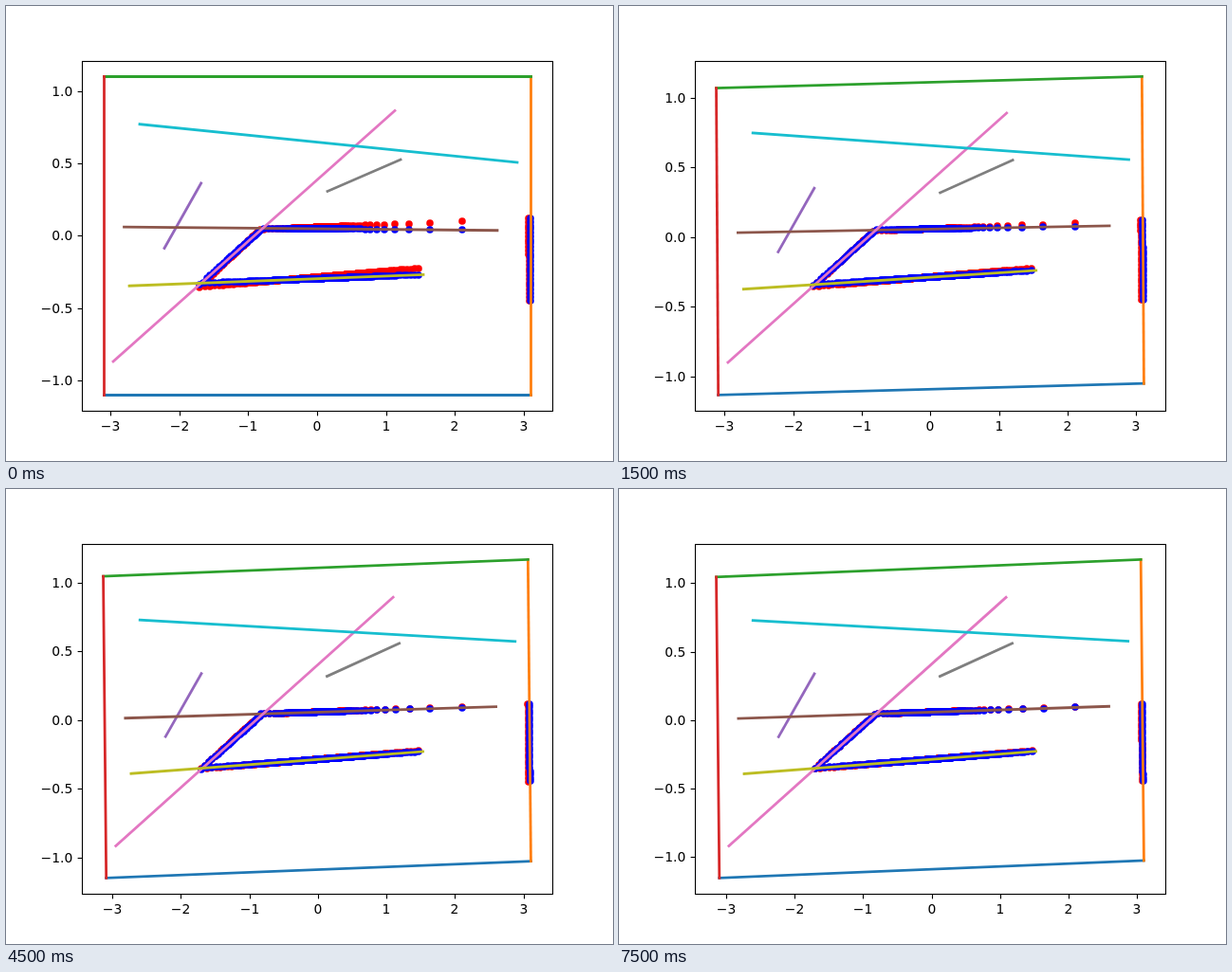
Recreate the animation shown at these times as an HTML page with a canvas. Size 640 by 480 pixels, loop 8 s.

```html
<!DOCTYPE html>
<html lang="en">
<head>
<meta charset="utf-8">
<title>Scan matching</title>
<style>
html, body { margin: 0; width: 640px; height: 480px; overflow: hidden; background: #fff; }
canvas { display: block; }
</style>
</head>
<body>
<canvas id="stage" width="640" height="480"></canvas>
<script>
const ctx = document.getElementById('stage').getContext('2d');
const STEP = 500, STEPS = 16;
const LEFT = 80, RIGHT = 576, TOP = 57.6, BOTTOM = 427.2;
const DOT = 3.8, BEAMS = 790;

// Map walls: x1, y1, x2, y2, colour
const WALLS = [
  [-3.1, -1.1, 3.1, -1.1, '#1f77b4'],
  [3.1, -1.1, 3.1, 1.1, '#ff7f0e'],
  [3.1, 1.1, -3.1, 1.1, '#2ca02c'],
  [-3.1, 1.1, -3.1, -1.1, '#d62728'],
  [-2.214, -0.086, -1.682, 0.363, '#9467bd'],
  [-2.798, 0.06, 2.612, 0.037, '#8c564b'],
  [-2.956, -0.868, 1.127, 0.864, '#e377c2'],
  [0.151, 0.307, 1.21, 0.526, '#7f7f7f'],
  [-2.722, -0.346, 1.54, -0.269, '#bcbd22'],
  [-2.571, 0.771, 2.901, 0.507, '#17becf']
];

// Rotate and shift the whole map
function pose(angle, tx, ty) {
  const c = Math.cos(angle), s = Math.sin(angle);
  const move = (x, y) => [c * x - s * y + tx, s * x + c * y + ty];
  return WALLS.map(([x1, y1, x2, y2, color]) => [...move(x1, y1), ...move(x2, y2), color]);
}

// Estimate after k matching steps
const estimate = k => pose(0.0207 * (1 - 0.71 ** k), -0.0014 * k, 0.0097 * (1 - 0.25 ** k));

// Nearest hit of every beam sent from the origin
function castScan(walls) {
  const hits = [];
  for (let i = 0; i < BEAMS; i++) {
    const a = i * 2 * Math.PI / BEAMS - 0.001;
    const dx = Math.cos(a), dy = Math.sin(a);
    let best = Infinity;
    for (const [x1, y1, x2, y2] of walls) {
      const ex = x2 - x1, ey = y2 - y1, det = dx * ey - dy * ex;
      const dist = (x1 * ey - y1 * ex) / det;
      const along = (x1 * dy - y1 * dx) / det;
      if (dist > 0 && along >= 0 && along <= 1) best = Math.min(best, dist);
    }
    hits.push([best * dx, best * dy]);
  }
  return hits;
}

function closestPoint([px, py], walls) {
  let best, bestDist = Infinity;
  for (const [x1, y1, x2, y2] of walls) {
    const ex = x2 - x1, ey = y2 - y1;
    const u = ((px - x1) * ex + (py - y1) * ey) / (ex * ex + ey * ey);
    const t = Math.max(0, Math.min(1, u));
    const q = [x1 + t * ex, y1 + t * ey];
    const d = Math.hypot(q[0] - px, q[1] - py);
    if (d < bestDist) { bestDist = d; best = q; }
  }
  return best;
}

const scan = castScan(pose(0.0231, -0.031, 0.01));

// Linear scale with a 5% margin at both ends
function scale(values, from, to) {
  const min = Math.min(...values), max = Math.max(...values);
  const unit = (to - from) / ((max - min) * 1.1);
  return v => (from + to) / 2 + (v - (min + max) / 2) * unit;
}

const snap = v => Math.round(v) + 0.5;

function line(x1, y1, x2, y2) {
  ctx.beginPath();
  ctx.moveTo(x1, y1);
  ctx.lineTo(x2, y2);
  ctx.stroke();
}

function dots(points, color, X, Y) {
  ctx.fillStyle = color;
  for (const [x, y] of points) {
    ctx.beginPath();
    ctx.arc(Math.round(X(x)), Math.round(Y(y)), DOT, 0, 2 * Math.PI);
    ctx.fill();
  }
}

function drawAxes(X, Y) {
  ctx.strokeStyle = ctx.fillStyle = '#000';
  ctx.lineWidth = 1.11;
  ctx.lineCap = 'butt';
  ctx.font = "13.89px 'DejaVu Sans', sans-serif";
  const label = (v, digits) => v.toFixed(digits).replace('-', '\u2212');
  ctx.textAlign = 'center';
  for (let v = -3; v <= 3; v++) {
    const x = snap(X(v));
    line(x, 427.5, x, 432.4);
    ctx.fillText(label(v, 0), x - 0.5, 448);
  }
  ctx.textAlign = 'right';
  for (let v = -1; v <= 1; v += 0.5) {
    const y = snap(Y(v));
    line(75.6, y, 80.5, y);
    ctx.fillText(label(v, 1), 70.3, y + 4.5);
  }
  ctx.strokeRect(80.5, 58.5, 496, 369);
}

function draw(k) {
  const walls = estimate(k);
  const X = scale(walls.flatMap(w => [w[0], w[2]]), LEFT, RIGHT);
  const Y = scale(walls.flatMap(w => [w[1], w[3]]), BOTTOM, TOP);
  ctx.fillStyle = '#fff';
  ctx.fillRect(0, 0, 640, 480);
  dots(scan, '#f00', X, Y);
  dots(scan.map(p => closestPoint(p, walls)), '#00f', X, Y);
  ctx.lineWidth = 2.78;
  ctx.lineCap = 'square';
  for (const [x1, y1, x2, y2, color] of walls) {
    const ends = [X(x1), Y(y1), X(x2), Y(y2)];
    const straight = x1 === x2 || y1 === y2;
    ctx.strokeStyle = color;
    line(...(straight ? ends.map(snap) : ends));
  }
  drawAxes(X, Y);
}

let shown = -1;
const start = performance.now();
function tick() {
  const k = Math.floor((performance.now() - start) / STEP) % STEPS;
  if (k !== shown) draw(shown = k);
  requestAnimationFrame(tick);
}
tick();
</script>
</body>
</html>
```
